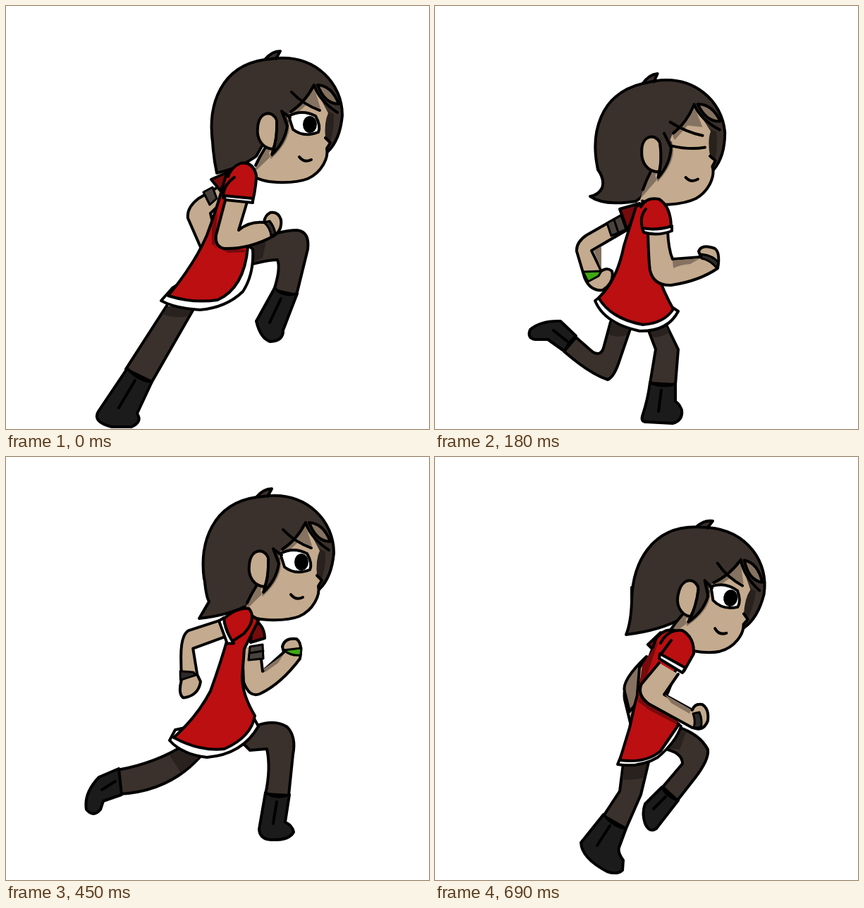
Animation of 600 by 600 pixels, one loop 780 ms. Source, as an HTML page without scripts:

```html
<!DOCTYPE html>
<html lang="en">
<head>
<meta charset="utf-8">
<title>Run cycle</title>
<style>
html, body { margin: 0; width: 100%; height: 100%; overflow: hidden; background: #fff; }
svg { display: block; width: 100%; height: 100%; }
path, ellipse { fill: none; stroke: #000; stroke-width: 4; stroke-linejoin: round; stroke-linecap: round; }
.hair { fill: #3a312c; }
.skin { fill: #c4aa8e; }
.red { fill: #bb0f11; }
.dim { fill: #760b0d; }
.white { fill: #fff; }
.boot { fill: #1b1b1b; }
.shade { fill: #857260; }
.dusk { fill: #28211e; }
.flat { stroke: none; }
.band { fill: var(--band, #2e2b2a); stroke-width: 3; }
.far { --band: #3fa912; }
.strap { fill: #4a423d; stroke-width: 3; }

/* each pose shows once per loop, starting at --t */
.pose { visibility: hidden; animation: brief 780ms step-end infinite; animation-delay: calc(var(--t) * 1ms - 780ms); }
.held { animation-name: held; }
@keyframes brief { 0% { visibility: visible; } 7.692308%, 100% { visibility: hidden; } }
@keyframes held { 0% { visibility: visible; } 11.538462%, 100% { visibility: hidden; } }
</style>
</head>
<body>
<svg viewBox="0 0 600 600">
<defs>
  <!-- head -->
  <g id="head">
    <path class="hair flat" d="M293 192C286 140 305 85 367 76Q377 64 389 64L384 74C440 70 477 110 477 155Q474 190 456 207L368 197Z"/>
    <path d="M293 192C286 140 305 85 367 76Q377 64 389 64L383 75M368 76L384 74C440 70 477 110 477 155Q474 190 456 207"/>
    <path class="dusk flat" d="M453 148L465 153Q466 180 457 199L453 188Z"/>
    <path class="skin flat" d="M436 112Q422 136 402 152L382 196L372 199L360 214L348 242C370 253 410 252 428 245C448 236 458 215 455 202L460 194L453 187Q451 165 457 152Z"/>
    <path class="shade flat" d="M436 112Q422 136 402 152L405 160L425 141L446 145Z"/>
    <path class="shade flat" d="M372 199L360 214L350 238L378 211ZM401 163Q407 188 376 217L373 208Z"/>
    <path d="M370 197L360 214L354 226M352 242C370 253 410 252 428 245C448 236 458 215 455 202L460 194L453 187"/>
    <path class="skin" d="M379 203C363 202 355 188 357 172C359 149 378 147 384 162Q386 186 379 203"/>
    <path class="hair flat" d="M384 163L392 149L401 163Q398 192 377 211Q385 190 384 163Z"/>
    <path d="M384 163Q385 190 377 211Q396 193 399 170L391 149"/>
    <path d="M437 112Q424 137 404 150M437 112Q444 134 470 151"/>
    <path class="shade" d="M442 112Q462 113 472 139Q452 139 442 112Z"/>
    <path d="M416 214Q423 223 433 218"/>
  </g>
  <g id="open">
    <use href="#head"/>
    <path class="white" d="M401 156Q420 146 439 156Q447 170 443 179Q422 187 407 175Z"/>
    <ellipse class="flat" cx="431" cy="168" rx="10" ry="12" style="fill:#000"/>
    <path d="M403 158L392 150M405 122Q422 140 445 148"/>
  </g>
  <g id="shut">
    <use href="#head"/>
    <path d="M401 168Q425 176 447 174M401 134Q422 150 445 157"/>
  </g>

  <!-- legs -->
  <g id="l1">
    <path class="hair" d="M228 425L170 515L207 533L266 430"/>
    <path class="dusk flat" d="M230 426L222 437Q240 444 258 440L264 430Z"/>
    <path class="boot" d="M172 514L131 575Q122 590 150 597L178 597Q194 590 186 578L207 533Q188 532 172 514ZM183 531L160 570"/>
    <path class="hair" d="M346 337Q385 318 413 318Q431 320 428 345L412 410L380 403Q390 372 385 360Q372 360 346 367"/>
    <path class="dusk flat" d="M350 338L370 329L364 357L350 363Z"/>
    <path class="boot" d="M381 400L355 447Q361 472 375 476Q394 475 393 460L413 408Q393 413 381 400ZM390 415L374 449"/>
  </g>
  <g id="l2">
    <path class="hair" d="M250 412Q205 442 148 452L152 486Q225 482 270 428"/>
    <path class="dusk flat" d="M248 416L222 431L238 456L268 430Z"/>
    <path class="boot" d="M150 450L122 462Q100 485 104 508Q114 520 124 508L128 496L154 487ZM145 468L126 480"/>
    <path class="hair" d="M322 400Q365 375 389 391Q402 405 397 430L391 488L358 486Q366 450 360 422L336 424L322 410"/>
    <path class="boot" d="M358 484L349 536Q350 550 366 551Q392 552 398 540Q396 530 386 526L392 487Q374 494 358 484ZM374 497L369 528"/>
  </g>
  <g id="l3">
    <path class="hair" d="M242 427L230 440Q217 452 210 438L202 420L181 437L205 483Q222 507 239 485L268 433"/>
    <path class="dusk flat" d="M242 429L233 440Q248 449 260 443L266 434Z"/>
    <path class="boot" d="M181 437L172 410Q152 419 149 405Q155 392 175 375Q185 370 187 380L202 420Q195 432 181 437ZM187 423L177 402"/>
    <path class="hair" d="M307 432L340 531L368 520L335 427"/>
    <path class="dusk flat" d="M310 434L314 447Q328 448 339 441L334 428Z"/>
    <path class="boot" d="M340 532L358 588H378Q400 567 400 552Q395 544 382 548L368 518Q358 530 340 532ZM358 531L370 561"/>
  </g>
  <g id="l4">
    <path class="hair" d="M249 448L239 485Q235 497 224 491L200 470L183 490Q220 522 245 530Q254 527 262 502L278 455"/>
    <path class="dusk flat" d="M250 450L247 466Q258 471 271 467L276 456Z"/>
    <path class="boot" d="M200 468L178 447Q150 446 135 459Q130 471 142 473L160 473L184 490Q188 478 200 468ZM188 476L168 460"/>
    <path class="hair" d="M302 458L313 487L305 535L341 537L345 487L327 450"/>
    <path class="dusk flat" d="M304 459L309 470Q322 470 332 463L327 452Z"/>
    <path class="boot" d="M305 534Q302 558 294 582Q292 590 300 590L337 592Q352 588 350 573Q346 563 341 561V536Q322 542 305 534ZM321 545L317 575"/>
  </g>
  <g id="l5">
    <path class="hair" d="M300 430Q335 445 342 462Q342 478 318 490L268 517L249 489L298 465L285 442"/>
    <path class="boot" d="M250 488L216 490Q196 500 200 514Q206 524 222 522L268 518Q252 506 250 488ZM242 503L220 506"/>
    <path class="hair" d="M262 440L264 485L256 530L291 536L300 487L300 444"/>
    <path class="dusk flat" d="M264 443V461Q282 466 298 461V445Z"/>
    <path class="boot" d="M256 529L239 575Q238 586 250 589L284 594Q299 592 297 578L288 564L291 536Q272 540 256 529ZM271 542L262 573"/>
  </g>
  <g id="l6">
    <path class="hair" d="M330 384Q362 394 373 416Q375 430 355 456L330 488L309 469L337 436Q337 420 311 415"/>
    <path class="dusk flat" d="M331 388L342 392L333 416L315 414Z"/>
    <path class="boot" d="M308 469L284 493Q279 506 284 521Q290 535 300 528L331 488Q315 483 308 469ZM313 483L296 500"/>
    <path class="hair" d="M253 436L248 475L225 510L257 528L278 480L289 434"/>
    <path class="dusk flat" d="M254 440L252 458Q268 460 282 456L286 436Z"/>
    <path class="boot" d="M225 508L193 548Q194 570 230 589Q245 594 252 587L253 573Q245 562 247 555L257 528Q240 526 225 508ZM234 524L216 552"/>
  </g>

  <!-- dress -->
  <g id="d1">
    <path class="white" d="M236 400L220 418Q240 429 275 431Q312 428 336 405Q352 380 350 345L338 335Z"/>
    <path class="red" d="M312 240Q300 285 285 325Q268 365 230 411Q265 422 300 417Q338 400 343 342Q321 308 338 275L352 235Q335 218 312 240Z"/>
  </g>
  <g id="d2">
    <path class="white" d="M230 395L222 410Q240 430 275 434Q325 430 348 390L338 372Z"/>
    <path class="red" d="M312 236Q300 285 280 340Q262 375 228 406Q265 426 300 422Q338 405 343 375Q325 345 325 320L328 280L348 240Q330 222 312 236Z"/>
  </g>
  <path id="hem3" class="white" d="M240 390L228 404Q242 427 275 433Q325 435 353 408L342 395Z"/>
  <g id="d3">
    <use href="#hem3"/>
    <path class="red" d="M318 242L300 290L275 345Q262 380 234 401Q262 424 300 427Q335 422 347 402Q332 375 326 340L328 285L345 245Q335 232 318 242Z"/>
  </g>
  <g id="e3">
    <use href="#hem3"/>
    <path class="red" d="M298 260Q290 300 274 335Q262 370 234 401Q262 422 300 425Q335 421 347 402Q330 370 324 340Q337 310 338 285L343 242L318 238Z"/>
  </g>
  <g id="d4">
    <path class="white" d="M240 408L227 418Q240 450 290 461Q330 462 345 433L333 425Z"/>
    <path class="red" d="M285 285L268 340Q258 390 232 414Q250 444 295 452Q325 450 338 430Q310 380 303 325L318 290Q305 270 285 285Z"/>
  </g>
  <g id="d5">
    <path class="white" d="M250 415L240 430Q270 452 300 450Q330 435 342 412L330 402Z"/>
    <path class="red" d="M292 272Q270 330 262 380L244 424Q275 444 300 440Q325 428 336 408Q310 380 306 340L325 285Q310 260 292 272Z"/>
  </g>
  <g id="d6">
    <path class="white" d="M252 420L245 437Q277 442 302 427Q328 405 335 383L325 375Z"/>
    <path class="red" d="M300 258Q275 320 262 385L248 431Q285 436 306 418L332 380Q308 365 310 348Q325 320 330 290L340 255Q318 236 300 258Z"/>
  </g>

  <!-- arm swung forward -->
  <g id="f1">
    <path class="skin" d="M312 272L298 325Q296 342 310 344Q345 345 380 326Q392 318 390 303Q386 291 375 293Q367 297 366 307Q345 305 330 318L342 278"/>
    <path class="band" d="M366 307L374 305Q381 314 382 323L376 326Q375 315 366 307Z"/>
  </g>
  <g id="f3">
    <path class="skin" d="M325 286L327 335Q335 358 350 352Q380 338 407 302Q411 280 402 274Q385 272 382 285L384 293L354 320L350 286"/>
    <path class="shade flat" d="M355 317L384 296L376 308L358 321Z"/>
    <path class="band" d="M384 290L409 287L408 297Q395 299 384 290Z"/>
  </g>
  <g id="f4">
    <path class="skin" d="M302 318Q303 362 305 375Q310 397 335 396Q375 390 401 372Q405 350 397 344Q378 337 374 348L377 356L337 359Q331 345 330 318"/>
    <path class="shade flat" d="M337 361L376 358L362 366Q348 367 338 372Z"/>
    <path class="band" d="M378 352Q395 354 402 364L400 372Q390 360 378 358Z"/>
  </g>
  <g id="f6">
    <path class="skin" d="M301 288L276 318Q269 333 286 346L348 380Q364 386 370 370Q372 353 362 347Q351 345 348 355L308 333L328 304"/>
    <path class="shade flat" d="M309 333L346 354L344 360L318 345Z"/>
    <path class="band" d="M349 360L358 358Q363 370 360 380L350 380Q353 370 349 360Z"/>
  </g>

  <!-- arm swung back -->
  <g id="b1">
    <path class="skin" d="M306 256L263 281Q246 294 248 309L269 357Q278 367 291 364Q304 352 298 337L288 336L280 302L316 268"/>
    <path class="band" d="M270 358Q286 352 289 341L296 344Q292 358 277 364Z"/>
  </g>
  <g id="b3">
    <path class="skin" d="M305 238L250 236Q237 238 226 270L216 299Q205 315 210 323Q231 328 241 310L240 299L247 262H300"/>
    <path class="band" d="M219 286L236 294L238 299L215 298Z"/>
  </g>
  <g id="b4">
    <path class="skin" d="M280 288L215 325Q200 335 201 348L212 385Q220 405 238 403Q255 392 251 376Q244 370 236 376L222 347L282 312"/>
    <path class="shade flat" d="M225 347L236 341V374Z"/>
    <path class="band" d="M210 377L236 376L232 383L217 391Z"/>
  </g>
  <g id="b6">
    <path class="skin" d="M297 278L268 305Q252 325 255 345L263 378Q276 390 292 382Q299 372 293 364L280 365Q274 345 282 325L310 293"/>
    <path class="band" d="M262 373L284 374V380L266 380Z"/>
  </g>

  <!-- near sleeve over the forward arm -->
  <g id="s1">
    <path class="red" d="M324 243Q308 254 308 272L350 277Q355 255 355 240Q350 220 333 223Q320 228 315 242"/>
    <path class="white" d="M309 269L350 273V279L311 275Z"/>
  </g>
  <g id="s3">
    <path class="red" d="M321 250L320 282Q345 291 358 275Q355 250 340 238Q328 234 320 245"/>
    <path class="white" d="M320 279Q342 284 358 271V279Q342 292 320 286Z"/>
  </g>
  <g id="s4">
    <path class="red" d="M299 288Q289 300 295 318Q315 322 335 315Q335 285 318 274Q300 270 292 285"/>
    <path class="white" d="M294 315Q315 319 336 312V319Q315 327 296 321Z"/>
  </g>
  <g id="s6">
    <path class="red" d="M318 258L302 280L336 302L350 277Q351 254 334 244Q313 242 303 262"/>
    <path class="white" d="M302 277L338 297L334 304L301 284Z"/>
  </g>

  <!-- near sleeve over the backward arm -->
  <g id="t1">
    <path class="red" d="M334 231Q315 236 304 259L321 275Q345 275 353 248Q356 230 346 222Q330 219 318 231"/>
    <path class="white" d="M306 252L322 270L318 276L300 258Z"/>
  </g>
  <g id="t3">
    <path class="red" d="M301 238Q325 228 341 236Q347 254 322 267L301 272Z"/>
    <path class="white" d="M295 238L303 236Q298 255 304 275L295 272Z"/>
  </g>
  <g id="t4">
    <path class="red" d="M276 288Q300 266 316 275Q328 290 306 308L283 318Z"/>
    <path class="white" d="M270 290L277 286Q278 304 286 317L279 319Z"/>
  </g>
  <g id="t6">
    <path class="red" d="M318 250L297 272L318 292Q338 290 342 260Q340 241 327 240Q308 243 301 258"/>
    <path class="white" d="M298 270L321 288L316 295L294 277Z"/>
  </g>

  <!-- far sleeve and straps -->
  <g id="u1">
    <path class="strap" d="M280 264L293 257L299 273L289 282Z"/>
    <path class="dim" d="M291 246L318 234L304 262Z"/>
  </g>
  <g id="u3">
    <path class="strap" d="M266 237H288V262H266ZM278 237V262"/>
    <path class="white" d="M288 238H294L296 274L290 262Z"/>
    <path class="dim" d="M296 238H318L300 275Z"/>
  </g>
  <g id="u4">
    <path class="strap" d="M244 308L264 297L271 317L250 326ZM254 303L260 321"/>
    <path class="dim" d="M262 288L290 280L273 318Z"/>
  </g>
  <g id="v3">
    <path class="strap" d="M336 285L354 282L355 302L334 304ZM336 294L355 291"/>
    <path class="dim" d="M340 245Q357 255 357 273L337 279Z"/>
  </g>
</defs>

<g class="pose" style="--t:0">
  <path class="hair" d="M292 165Q292 205 299 237Q335 228 355 213L368 190"/>
  <use href="#open"/>
  <use href="#b1" x="10" y="-8" class="far"/><use href="#u1"/><use href="#l1"/><use href="#d1"/>
  <path class="dim flat" d="M318 242L300 290L296 342L338 346L342 349L315 350L292 338L292 312Z"/>
  <use href="#f1"/><use href="#s1"/>
</g>

<g class="pose" style="--t:60">
  <path class="hair" d="M279 160Q282 200 286 218L284 238Q315 236 342 218L357 190"/>
  <use href="#open" x="-13" y="-10"/>
  <g transform="rotate(-20 300 250)"><use href="#b3" class="far"/><use href="#u3"/></g>
  <use href="#l2"/><use href="#d2"/><use href="#f3" x="-2" y="-8"/><use href="#s3" x="-2" y="-8"/>
</g>

<g class="pose" style="--t:120">
  <path class="hair" d="M267 165Q270 200 276 215Q278 230 271 236Q300 242 325 235L338 215L352 190"/>
  <use href="#open" x="-25" y="-5"/>
  <use href="#b3" class="far"/><use href="#u3"/><use href="#l3"/><use href="#d3"/><use href="#f3"/><use href="#s3"/>
</g>

<g class="pose" style="--t:180">
  <path class="hair" d="M228 200L231 232Q241 246 237 258Q232 268 220 270Q240 284 285 277Q305 265 312 232"/>
  <use href="#shut" transform="translate(-65 32) rotate(-5 385 160)"/>
  <use href="#b4" class="far"/><use href="#u4"/><use href="#l4"/><use href="#d4"/><use href="#f4"/><use href="#s4"/>
</g>

<g class="pose" style="--t:240">
  <path class="hair" d="M246 195L250 226Q256 250 247 268Q285 274 305 262L330 225"/>
  <use href="#open" transform="translate(-46 26) rotate(-5 385 160)"/>
  <g transform="translate(10 -10)"><use href="#b4" class="far"/><use href="#u4"/></g>
  <use href="#l5"/><use href="#d5"/><use href="#f4" x="8" y="-10"/><use href="#s4" x="8" y="-10"/>
</g>

<g class="pose held" style="--t:300">
  <path class="hair" d="M269 190L271 213Q274 240 281 261Q315 250 335 234L350 205"/>
  <use href="#open" transform="translate(-25 15) rotate(-4 385 160)"/>
  <use href="#f6" class="far"/><use href="#l6"/><path class="dim" d="M331 285L342 288L340 298L332 296Z"/>
  <use href="#d6"/>
  <path class="dim flat" d="M280 362Q299 357 299 375Q295 390 270 388Z"/>
  <use href="#b6"/><use href="#t6"/>
</g>

<g class="pose" style="--t:390">
  <path class="hair" d="M285 150Q288 205 294 237Q310 215 347 205L362 180"/>
  <use href="#open" x="-8" y="-13"/>
  <g transform="translate(-1 -7)">
    <use href="#f1" class="far"/><use href="#l1"/><path class="dim" d="M340 255L353 250L350 279L343 279Z"/>
    <use href="#d1"/>
    <path class="dim flat" d="M288 330Q305 330 304 352Q298 372 272 369Z"/>
    <use href="#b1"/><use href="#t1"/>
  </g>
</g>

<g class="pose" style="--t:450">
  <path class="hair" d="M280 150Q282 195 288 205L274 229Q315 225 348 208L360 180"/>
  <use href="#open" x="-12" y="-19"/>
  <g transform="translate(10 -8)">
    <use href="#f3" y="-8" class="far"/><use href="#v3" y="-8"/><use href="#l2"/><use href="#d2"/>
    <g transform="translate(0 -5) rotate(-20 315 250)"><use href="#b3"/><use href="#t3"/></g>
  </g>
</g>

<g class="pose" style="--t:510">
  <path class="hair" d="M272 170Q272 195 280 210Q282 230 258 229Q275 243 310 241L331 234L343 207L358 190"/>
  <use href="#open" x="-20" y="-6"/>
  <g transform="translate(22 2)">
    <use href="#f3" x="5" y="2" class="far"/><use href="#v3"/><use href="#l3"/><use href="#e3"/><use href="#b3" y="4"/><use href="#t3"/>
  </g>
</g>

<g class="pose" style="--t:570">
  <path class="hair" d="M247 195L248 222Q262 252 238 268Q260 282 305 275Q325 262 334 230"/>
  <use href="#open" transform="translate(-45 30)"/>
  <g transform="translate(25 1)">
    <use href="#f4" class="far"/><use href="#l4"/><use href="#d4"/><use href="#b4"/><use href="#t4"/>
  </g>
</g>

<g class="pose" style="--t:630">
  <path class="hair" d="M264 195L266 217Q268 240 255 262Q300 266 335 245L350 215"/>
  <use href="#open" transform="translate(-26 30) rotate(3 385 160)"/>
  <g transform="translate(20 0)">
    <use href="#f4" x="8" y="-10" class="far"/><use href="#l5"/><use href="#d5"/><use href="#b4" x="10" y="-10"/><use href="#t4" x="10" y="-10"/>
  </g>
</g>

<g class="pose held" style="--t:690">
  <path class="hair" d="M279 185L279 205Q278 235 271 252Q320 246 352 228L365 200"/>
  <use href="#open" transform="translate(-10 25) rotate(9 385 160)"/>
  <g transform="translate(14 -1)">
    <use href="#b6" class="far"/><path class="shade" d="M286 284Q250 318 255 334L262 362L272 350L276 300Z"/>
    <path class="dim" d="M288 267L306 250L296 275Z"/>
    <use href="#l6"/><use href="#d6"/>
    <path class="dim flat" d="M303 262L280 296L274 338L331 376L328 380L290 360L274 348Z"/>
    <use href="#f6" x="3" y="5"/><use href="#s6" x="3" y="3"/>
  </g>
</g>
</svg>
</body>
</html>
```
